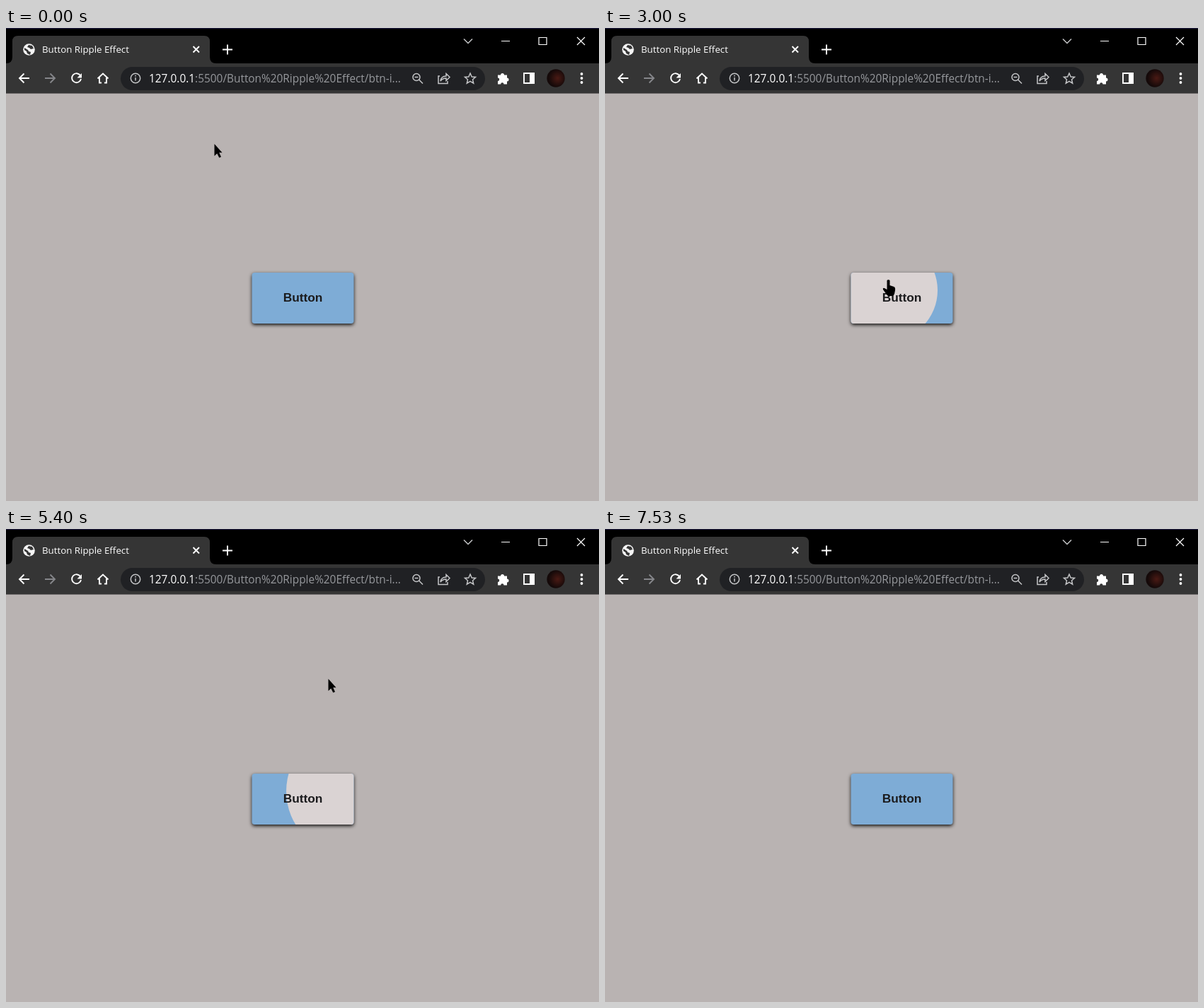
An HTML page for the animation above (7.6 s loop, 838 by 669 pixels).

```html
<!DOCTYPE html>
<html lang="en">
<head>
<meta charset="utf-8">
<title>Button Ripple Effect</title>
<style>
  html, body { margin: 0; width: 100%; height: 100%; overflow: hidden; background: #b9b3b2; }
  svg { display: block; width: 838px; height: 669px; }
  .ui { font-family: "Open Sans", "Noto Sans", sans-serif; fill: #fff; }
  .label { font: bold 17.3px "Liberation Sans", Arial, sans-serif; fill: #1b1b1d; }
  .line { fill: none; stroke: #fff; stroke-width: 1.9; }
  .thin { stroke-width: 1.2; }
  .dim { stroke: #c4c5c7; stroke-width: 1.5; }
  .faded { stroke: #85868a; }
  .button { fill: #7eacd6; filter: drop-shadow(0 2.5px 2.7px rgba(0, 0, 0, .9)); }
</style>
</head>
<body>
<svg viewBox="0 0 838 669">
  <defs>
    <clipPath id="clip"><rect x="347.5" y="346" width="144" height="72" rx="4"/></clipPath>
    <radialGradient id="face" cx=".6"><stop stop-color="#4a1a14"/><stop offset="1" stop-color="#140909"/></radialGradient>
  </defs>

  <!-- Title bar and tab -->
  <rect width="838" height="50"/>
  <rect width="838" height="1" fill="#1c1a40"/>
  <path d="M0 50q9 0 9-9V19q0-8 8-8H280q8 0 8 8V41q0 9 9 9z" fill="#353535"/>
  <circle cx="32.5" cy="30.5" r="8.3" fill="#f4f4f4"/>
  <path d="M26 28l5 3 1 2 3 1-1 4-4-2-1-3-3-2zM32 24l5 1 2 4-4 1-2-2-3-1z" fill="#353535"/>
  <text class="ui" x="51" y="35" font-size="13.3">Button Ripple Effect</text>
  <path class="line" d="M264.5 26l8.5 8.5m0-8.5l-8.500 8.5M306 30.500h14m-7-7v14"/>
  <path class="line thin" d="M700 18.500h12M753 13.500h11v10h-11zM807 13l11 11m0-11l-11 11"/>
  <path class="line dim thin" d="M647 15.5l6 6 6-6"/>

  <!-- Toolbar -->
  <rect y="50" width="838" height="43" fill="#353535"/>
  <rect y="92" width="838" height="1" fill="#6b6868"/>
  <path class="line" d="M33 71H19m6.5-6.5L19 71l6.5 6.5"/>
  <path class="line faded" d="M55 71h14m-6.5-6.5L69 71l-6.5 6.5"/>
  <path class="line" d="M105 67a6.5 6.5 0 1 0 1 5"/>
  <path d="M107 64v6.5h-6.5z" fill="#fff"/>
  <path class="line" d="M129.5 71.5l7.5-7 7.5 7M132 70v7.5h3m4 0h3V70"/>
  <rect x="162" y="55" width="515" height="33" rx="16.5" fill="#202124"/>
  <circle class="line dim" cx="183" cy="71" r="6.7"/>
  <path class="line dim" d="M183 70v4.5m0-7.7v1.7"/>
  <text class="ui" x="202" y="77" font-size="15.4">127.0.0.1<tspan fill="#96989c">:5500/Button%20Ripple%20Effect/btn-i...</tspan></text>
  <circle class="line dim" cx="580" cy="69.5" r="5"/>
  <path class="line dim" d="M583.5 73l5.5 5.5M577.5 69.5h5"/>
  <path class="line dim" d="M613 68h-2v10.5h13V75M614 75q1-7 8-7v-3.5l5 5-5 5V71q-5 0-8 4z"/>
  <path class="line dim" d="M656 64l2.2 5 5.3.4-4 3.5 1.2 5.3-4.700-2.8-4.700 2.8 1.2-5.3-4-3.5 5.3-.4z"/>
  <path d="M695 66.5h4a2.5 2.5 0 1 1 5 0h4v4a2.5 2.5 0 1 1 0 5v4h-4.500a2.2 2.2 0 1 0-4.400 0H695V75a2.2 2.2 0 1 0 0-4.400z" fill="#fff"/>
  <path class="line" d="M732 64h14v14h-14z"/>
  <path d="M740 63h7v16h-7z" fill="#fff"/>
  <circle cx="777" cy="71" r="12.7" fill="url(#face)"/>
  <path d="M813.5 65v.1m0 5.900v.1m0 5.900v.1" stroke="#fff" stroke-width="3.8" stroke-linecap="round"/>

  <!-- Page -->
  <rect class="button" x="347.5" y="346" width="144" height="72" rx="4"/>
  <g clip-path="url(#clip)"><circle id="ripple" fill="#dad3d3"/></g>
  <text class="label" x="419.5" y="387" text-anchor="middle">Button</text>
  <path id="cursor"/>
</svg>
<script>
  const FPS = 15, STEPS = 114, LOOP = 7600;
  const RIPPLE_SPEED = 18, RIPPLE_MAX = 110;
  const ARROW = 'M.5 0V17L4.3 13.5l3 6 2.700-1.300-2.800-6H11.500z';
  const HAND = 'M-.5 1q2-2 4 0v7l6 2q2 1 1.5 5l-1 5q-1 3-3 3h-5q-2 0-3-2l-5-7q-1-3 2-2l3.5 2z';

  // Pointer stops: step, x, y
  const stops = [
    [0, 294, 164], [14, 347, 408], [21, 440, 300], [36, 315, 360],
    [40, 335, 365], [41, 398, 371], [45, 399, 356], [65, 521, 413],
    [73, 494, 408], [74, 486, 371], [80, 458, 350], [81, 455, 212],
    [89, 335, 330], [90, 371, 371], [93, 361, 359], [102, 597, 340]
  ];

  const cursor = document.getElementById('cursor');
  const ripple = document.getElementById('ripple');
  const smooth = p => p * p * (3 - 2 * p);

  function pointerAt(step) {
    const next = stops.findIndex(stop => stop[0] > step);
    if (next < 0) return step === stops.at(-1)[0] ? stops.at(-1).slice(1) : null;
    const [k0, x0, y0] = stops[next - 1], [k1, x1, y1] = stops[next];
    const p = smooth((step - k0) / (k1 - k0));
    return [x0 + (x1 - x0) * p, y0 + (y1 - y0) * p];
  }

  const isOver = ([x, y]) => x > 348 && x < 491 && y > 346 && y < 418;

  // The ripple starts where the pointer enters, grows while it stays and shrinks once it leaves
  function simulate() {
    let cx = 0, cy = 0, r = 0, wasOver = false;
    return Array.from({ length: STEPS }, (_, step) => {
      const pointer = pointerAt(step);
      const over = pointer !== null && isOver(pointer);
      if (over && !wasOver) {
        [cx, cy] = pointer;
        r = 0;
      } else {
        r = Math.max(0, Math.min(RIPPLE_MAX, r + (over ? RIPPLE_SPEED : -RIPPLE_SPEED)));
      }
      wasOver = over;
      return { pointer, over, cx, cy, r };
    });
  }

  const states = simulate();

  function draw(ms) {
    // Step times are rounded down to 10 ms
    const step = Math.floor((ms % LOOP + 6.7) * FPS / 1000) % STEPS;
    const { pointer, over, cx, cy, r } = states[step];
    cursor.setAttribute('visibility', pointer ? 'visible' : 'hidden');
    if (pointer) {
      cursor.setAttribute('d', over ? HAND : ARROW);
      cursor.setAttribute('transform', `translate(${pointer})`);
    }
    ripple.setAttribute('cx', cx);
    ripple.setAttribute('cy', cy);
    ripple.setAttribute('r', r);
  }

  let start;
  function tick(now) {
    start ??= now;
    draw(now - start);
    requestAnimationFrame(tick);
  }
  draw(0);
  requestAnimationFrame(tick);
</script>
</body>
</html>
```
